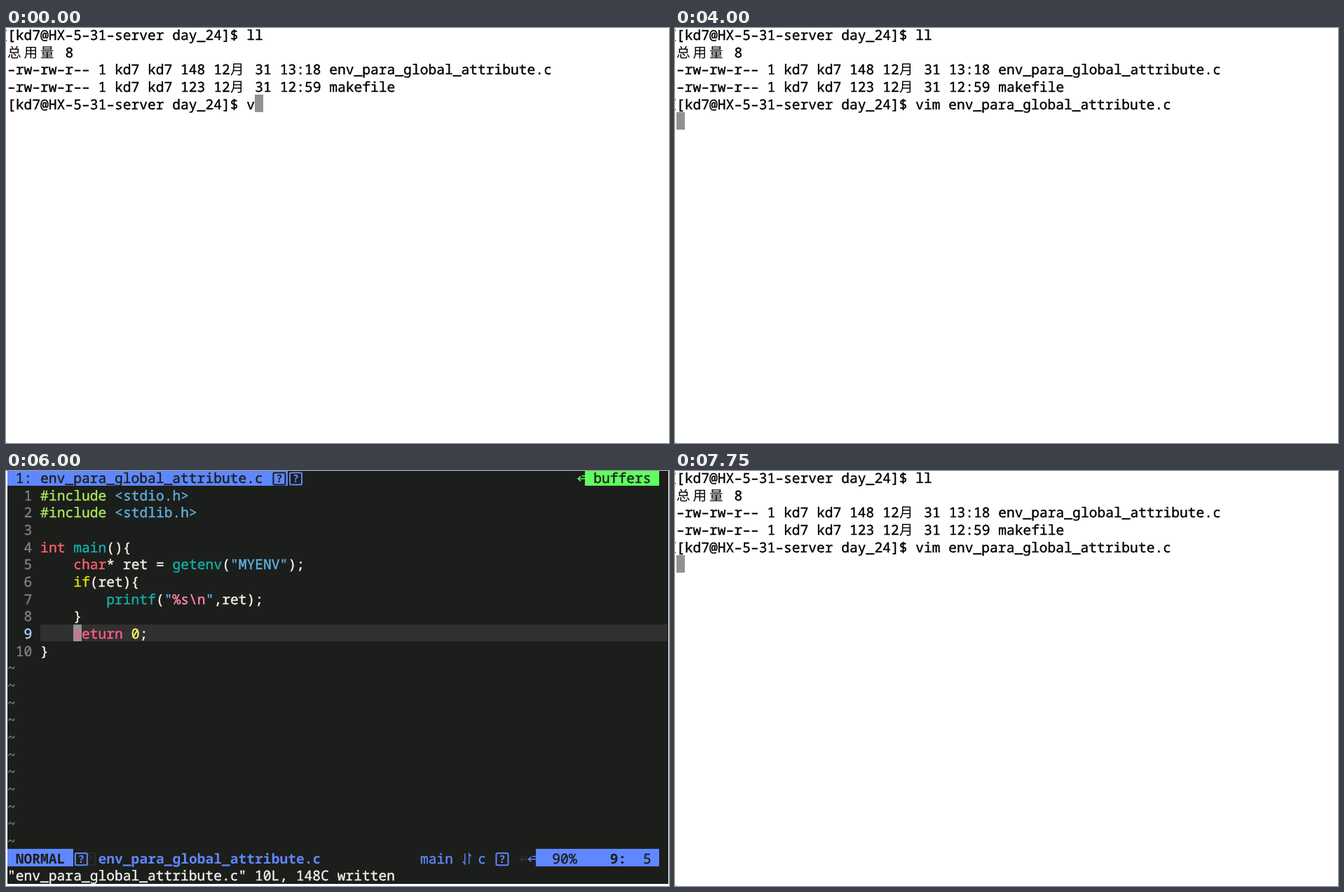
An HTML page that plays this animation: 946x592 px, repeating every 8 s.

```html
<!DOCTYPE html>
<html lang="en">
<head>
<meta charset="utf-8">
<title>Terminal session</title>
<style>
  html, body { margin: 0; width: 100%; height: 100%; overflow: hidden; background: #fff; }
  svg { display: block; width: 946px; height: 592px; }
  text {
    font: 19.63px "Noto Sans Mono", "Noto Sans CJK SC", "Noto Sans CJK", monospace;
    text-rendering: geometricPrecision;
    white-space: pre;
    stroke-width: .4px;
  }
  .cjk { font-family: "Noto Sans CJK SC", "Noto Sans CJK", sans-serif; letter-spacing: 3.93px; stroke-width: 0; }
  .b { font-weight: 700; stroke-width: 0; }
</style>
</head>
<body>
<svg id="screen" viewBox="0 0 946 592"></svg>
<script>
const COL = 11.778, ROW = 24.67, LOOP = 8000;
const DARK = '#1c1e1b', BLUE = '#5f87ff', GREEN = '#5fff5f', GREY = '#919191', WHITE = '#f1f1ee';
const FILE = 'env_para_global_attribute.c';
const PROMPT = '[kd7@HX-5-31-server day_24]$ ';

const x = c => 2 + c * COL;
const y = r => -3 + r * ROW;
// Hyphens are drawn as wide as the cell
const esc = s => s.replace(/&/g, '&amp;').replace(/</g, '&lt;').replace(/-/g, '–');

const text = (c, r, s, fill, cls = '') =>
  `<text x="${x(c)}" y="${y(r) + 20}" fill="${fill}" stroke="${fill}" class="${cls}">${esc(s)}</text>`;
const rect = (left, top, w, h, fill) =>
  `<rect x="${left}" y="${top}" width="${w}" height="${h}" fill="${fill}"/>`;
// Cell backgrounds snap to whole pixels
function cells(c, r, n, fill) {
  const left = Math.round(x(c)), top = Math.floor(y(r));
  return rect(left, top, Math.round(x(c + n)) - left, Math.floor(y(r + 1)) - top, fill);
}
const cursor = (c, r) => cells(c, r, 1, GREY);
const stroke = (d, color, w = 1.6) =>
  `<path d="${d}" fill="none" stroke="${color}" stroke-width="${w}"/>`;

// Places runs of [text, colour] one after another
function runs(c, r, list) {
  return list.map(([s, color]) => {
    const out = text(c, r, s, color);
    c += s.length;
    return out;
  }).join('');
}

// Boxed question mark shown for a missing glyph
function missing(c, r, color) {
  const left = x(c) + 2.6, top = y(r) + 5.5;
  return `<rect x="${left}" y="${top}" width="17" height="17" rx="1.5" fill="none" stroke="${color}" stroke-width="2"/>` +
    `<text x="${left + 8.5}" y="${top + 13.8}" fill="${color}" class="b" text-anchor="middle" style="font-size:15px">?</text>`;
}

function arrow(c, r, color) {
  const l = x(c) + 1.5, m = y(r) + 14;
  return stroke(`M${l + 10.5} ${m}H${l}m4 -3.5l-4 3.5l4 3.5M${l + 10.5} ${m - 4}h-5`, color);
}

const promptMark = r => rect(0, y(r) + 5.8, 1, 1.5, '#222') + rect(0, y(r) + 20, 1, 1.5, '#222');

function listing(r, size, time, name) {
  return text(0, r, `-rw-rw-r-- 1 kd7 kd7 ${size} 12`, '#000') +
    text(27, r, '月', '#000', 'cjk') +
    text(30, r, `31 ${time} ${name}`, '#000');
}

function shell({ cmd, mark, run }) {
  return rect(0, 591, 1, 1, '#777') +
    promptMark(0) + (mark ? promptMark(4) : '') +
    (run ? cursor(0, 5) : cursor(PROMPT.length + cmd.length, 4)) +
    text(0, 0, PROMPT + 'll', '#000') +
    text(0, 1, '总用量', '#000', 'cjk') + text(7, 1, '8', '#000') +
    listing(2, 148, '13:18', FILE) +
    listing(3, 123, '12:59', 'makefile') +
    text(0, 4, PROMPT + cmd, '#000');
}

const LIME = '#afe65f', SKY = '#5fafe0', RED = '#ff5f6c', ROSE = '#ff5f87',
      TEAL = '#14afaf', PINK = '#ff87af', YELLOW = '#dfdf00';
const CODE = [
  [['#include ', LIME], ['<stdio.h>', SKY]],
  [['#include ', LIME], ['<stdlib.h>', SKY]],
  [],
  [['int ', RED], ['main', TEAL], ['(){', WHITE]],
  [['    char', RED], ['* ret = ', WHITE], ['getenv', TEAL], ['(', WHITE], ['"MYENV"', SKY], [');', WHITE]],
  [['    if', YELLOW], ['(ret){', WHITE]],
  [['        printf', TEAL], ['(', WHITE], ['"', SKY], ['%s\\n', PINK], ['"', SKY], [',ret);', WHITE]],
  [['    }', WHITE]],
  [['    return ', ROSE], ['0', '#ffff5f'], [';', WHITE]],
  [['}', WHITE]]
];

const blank = () => rect(2, 0, 943, 589, DARK);

function tabLine() {
  return cells(0, 0, 34, BLUE) + text(1, 0, '1: ' + FILE, DARK) +
    missing(32, 0, DARK) + missing(34, 0, BLUE) +
    arrow(69, 0, GREEN) + cells(70, 0, 9, GREEN) + text(71, 0, 'buffers', DARK);
}

function statusLine(mode) {
  const r = 22, end = mode.length + 2, left = x(55) + 5, top = y(r) + 6;
  return missing(end + 1, r, '#2b2d2a') + missing(end, r, BLUE) +
    cells(0, r, end, BLUE) + text(1, r, mode, DARK, 'b') +
    text(end + 3, r, FILE, BLUE, 'b') +
    text(50, r, 'main', BLUE) +
    stroke(`M${left} ${top}v15l-3 -4M${left + 6} ${top + 15}v-15l3 4`, BLUE, 1.4) +
    text(57, r, 'c', BLUE) + missing(59, r, BLUE) +
    arrow(62, r, '#333532') + arrow(63, r, BLUE) +
    cells(64, r, 15, BLUE) + text(66, r, '90%', DARK) +
    text(73, r, '9:', DARK, 'b') + text(77, r, '5', DARK);
}

function editor({ mode = 'NORMAL', msg = '', at }) {
  let out = blank() + tabLine() + cells(4, 9, 76, '#303030') + cursor(...at);
  CODE.forEach((line, i) => {
    const n = String(i + 1);
    out += text(3 - n.length, i + 1, n, i === 8 ? '#afd7ff' : '#80827f') + runs(4, i + 1, line);
  });
  for (let r = 11; r < 22; r++) out += text(0, r, '~', '#767876');
  return out + statusLine(mode) + text(0, 23, msg, WHITE);
}

const WRITTEN = `"${FILE}" 10L, 148C written`;
const OPEN = 'vim ' + FILE + ' ';
const STEPS = [
  [0, () => shell({ cmd: 'v' })],
  [500, () => shell({ cmd: 'vi' })],
  [1000, () => shell({ cmd: 'vim' })],
  [1250, () => shell({ cmd: 'vim ' })],
  [2000, () => shell({ cmd: 'vim e' })],
  [2250, () => shell({ cmd: 'vim e', mark: true })],
  [2500, () => shell({ cmd: OPEN, mark: true })],
  [4000, () => shell({ cmd: OPEN, mark: true, run: true })],
  [4250, () => blank() + cursor(0, 0)],
  [4750, () => editor({ at: [8, 9] })],
  [5750, () => editor({ msg: WRITTEN, at: [WRITTEN.length, 23] })],
  [6000, () => editor({ msg: WRITTEN, at: [8, 9] })],
  [6750, () => editor({ mode: 'COMMAND', msg: ':', at: [1, 23] })],
  [7250, () => editor({ mode: 'COMMAND', msg: ':q', at: [2, 23] })],
  [7750, () => shell({ cmd: OPEN, mark: true, run: true })]
];

const screen = document.getElementById('screen');
const start = performance.now();
let shown = -1;

function tick() {
  const t = (performance.now() - start) % LOOP;
  const i = STEPS.filter(([at]) => at <= t).length - 1;
  if (i !== shown) {
    screen.innerHTML = STEPS[i][1]();
    shown = i;
  }
  requestAnimationFrame(tick);
}
tick();
</script>
</body>
</html>
```
